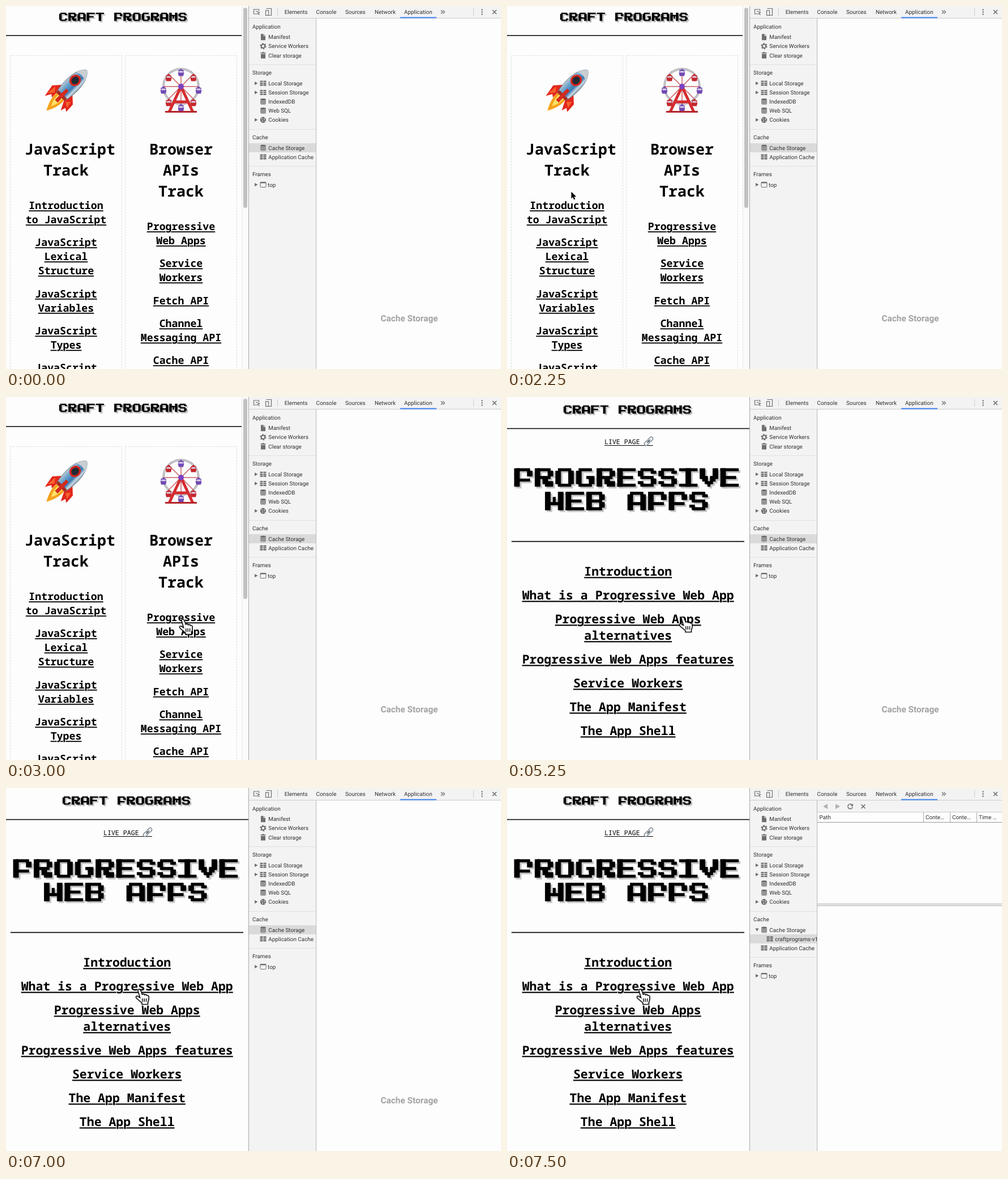
Animation, 874 px wide and 640 px high, one loop 8 s. Source, as an HTML page:

```html
<!DOCTYPE html>
<html lang="en">
<head>
<meta charset="utf-8">
<title>Cache storage demo</title>
<style>
  html, body { margin: 0; width: 100%; height: 100%; overflow: hidden; background: #fdfdfd; }
  svg { display: block; width: 100%; height: 100%; text-rendering: geometricPrecision; }
  .page { font-family: "Noto Sans Mono", monospace; font-weight: 700; text-anchor: middle; }
  .link { stroke: #fdfdfd; stroke-width: 2; paint-order: stroke; }
  .tools { font: 9.9px Roboto, "Liberation Sans", sans-serif; fill: #303030; }
  .icon { fill: #6e6e6e; }
  .line { stroke: #6e6e6e; fill: none; }
</style>
</head>
<body>
<svg id="stage" viewBox="0 0 874 640"></svg>
<script>
const LOOP = 8000, PAGE_CHANGE = 5250, CACHE_OPENED = 7250;

const rect = (x, y, w, h, fill = '#000', extra = '') =>
  `<rect x="${x}" y="${y}" width="${w}" height="${h}" fill="${fill}" ${extra}/>`;
const path = (d, attrs = '') => `<path d="${d}" ${attrs}/>`;
const text = (x, y, label, attrs = '') => `<text x="${x}" y="${y}" ${attrs}>${label}</text>`;
const at = (x, y, content, attrs = '') => `<g transform="translate(${x} ${y})" ${attrs}>${content}</g>`;

// Block lettering: bars on a 7 x 7 grid, combined into letters.
const BARS = {
  l: [0, 0, 2, 7], R: [5, 0, 2, 7], c: [0, 1, 2, 5], r: [5, 1, 2, 5],
  k: [0, 1, 2, 2], u: [5, 1, 2, 2], w: [5, 4, 2, 2], q: [5, 1, 2, 1],
  z: [0, 5, 2, 1], Z: [5, 5, 2, 1], a: [1, 0, 5, 1], t: [0, 0, 7, 1],
  m: [1, 3, 5, 1], p: [1, 4, 5, 1], e: [1, 2, 5, 1], d: [1, 6, 5, 1],
  b: [0, 6, 7, 1], i: [2.5, 0, 2, 7], x: [3, 4, 2, 2], y: [4, 5, 3, 2],
  g: [4, 3, 3, 1], f: [3, 2, 1, 3], h: [0, 0, 2, 4], j: [5, 0, 2, 4],
  n: [1, 3, 2, 2], o: [4, 3, 2, 2], v: [2, 5, 3, 1], s: [3, 6, 1, 1],
  A: [0, 1, 2, 6], B: [5, 1, 2, 6]
};
const LETTERS = {
  A: 'ABap', B: 'lamudw', C: 'cadqZ', E: 'ltmb', F: 'ltm', G: 'cadwg', I: 'tib', M: 'lRef',
  O: 'crad', P: 'laup', R: 'laumxy', S: 'akmwdqz', T: 'ti', V: 'hjnovs', W: 'lRfp'
};

function blockText(x, y, advance, label, shadow) {
  const unit = advance / 8;
  const d = [...label].map((letter, n) => [...(LETTERS[letter] || '')].map(key => {
    const [bx, by, w, h] = BARS[key];
    return `M${bx + n * 8} ${by}h${w}v${h}h${-w}z`;
  }).join('')).join('');
  const layer = (offset, color) => path(d, `fill="${color}" stroke="${color}" stroke-width=".18"
    transform="translate(${x + offset} ${y + offset}) scale(${unit})"`);
  return `<g role="img" aria-label="${label}">${layer(shadow, '#c4c4c4')}${layer(0, '#000')}</g>`;
}

function links(x, size, rows) {
  return rows.map(([y, label]) => {
    const width = label.length * size * 0.6;
    return rect(x - width / 2, y + 2.3, width, size / 10) +
      text(x, y, label, `class="link" font-size="${size}"`);
  }).join('');
}

const headings = rows => rows.map(([x, y, label]) => text(x, y, label, 'font-size="26.67"')).join('');

const rocket = `<g transform="translate(107 149) rotate(45) scale(.97)">
  ${path('M-9 14Q-13 29 0 52Q12 30 9 14Z', 'fill="#f6a21c"')}
  ${path('M-5 14Q-7 28 0 40Q7 28 5 14Z', 'fill="#ffe36a"')}
  ${path('M-11 -4L-25 12L-21 35L-15 24L-10 28V12ZM11 -4L26 10L27 28L21 24L18 33L9 15Z', 'fill="#e3251b"')}
  ${path('M-20 9L-21 28L-13 18ZM20 9L23 22L13 16Z', 'fill="#f4622e"')}
  ${path('M0 -52C14 -43 18 -16 11 15H-11C-18 -16 -14 -43 0 -52Z', 'fill="url(#hull)" stroke="#5f6f7c" stroke-width=".8"')}
  ${path('M0 -52C6 -48 9 -43 11 -36Q0 -42 -11 -36C-9 -43 -6 -48 0 -52Z', 'fill="#c9ced2"')}
  <ellipse cx="-2" cy="-24" rx="10" ry="11" fill="#d5251c"/>
  <ellipse cx="-2" cy="-24" rx="6.5" ry="7.5" fill="#222b35"/>
  ${path('M-11 10H11V16H-11Z', 'fill="#a72d23"')}
  ${path('M-3 -2H3L4 27H-3Z', 'fill="#d62a1e"')}
</g>`;

function ferrisWheel() {
  let spokes = '', cabins = '';
  for (let n = 0; n < 8; n++) {
    const angle = n * Math.PI / 4, x = 31 * Math.cos(angle), y = 31 * Math.sin(angle);
    spokes += path(`M0 0L${x} ${y}`, 'stroke="#c8565a" stroke-width="1.4"');
    const color = n % 2 ? '#c5262c' : '#7048b4';
    cabins += at(x, y + 7.5, rect(-4, -5, 8, 5, '#d8cfe4', `stroke="${color}"`) +
      path('M-5.5 -1H5.5L4 5H-4ZM-5 -4L0 -8L5 -4Z', `fill="${color}"`));
  }
  return at(309, 142, `<circle r="31" fill="none" stroke="#96949b" stroke-width="3.4"/>
    <circle r="31" fill="none" stroke="#dedde2" stroke-width="1.5"/>
    ${spokes}${cabins}
    ${path('M0 0L-21 45M0 0L21 45M-12 27H12', 'fill="none" stroke="#d42c30" stroke-width="5"')}
    ${rect(-28, 43, 56, 3, '#b4252b')}<circle r="5" fill="#7b42c4"/>`);
}

const homePage = `
  ${blockText(94, 12, 16.2, 'CRAFT PROGRAMS', 2.5)}
  ${rect(0, 51.3, 416, 1.6, '#111')}
  <g fill="none" stroke="#dadada" stroke-dasharray="3 2">
    <rect x="7.5" y="87.5" width="197" height="600"/><rect x="210.5" y="87.5" width="197" height="600"/>
  </g>
  ${rocket}${ferrisWheel()}
  ${headings([[113, 262, 'JavaScript'], [106, 299, 'Track'],
    [309, 262, 'Browser'], [309, 299, 'APIs'], [309, 336, 'Track']])}
  ${links(106, 18.25, [[358, 'Introduction'], [383, 'to JavaScript'], [423, 'JavaScript'],
    [448, 'Lexical'], [473, 'Structure'], [513.5, 'JavaScript'], [538.5, 'Variables'],
    [579, 'JavaScript'], [604, 'Types'], [644, 'JavaScript']])}
  ${links(309, 18.25, [[395, 'Progressive'], [420, 'Web Apps'], [460, 'Service'], [485, 'Workers'],
    [525.5, 'Fetch API'], [566, 'Channel'], [591, 'Messaging API'], [631, 'Cache API']])}
  ${rect(416, 0, 12, 640, '#fafafa')}${rect(416, 0, 1, 640, '#e7e7e7')}
  ${rect(419, 3, 7, 353, '#c1c1c1', 'rx="3.5"')}`;

const chain = at(250, 78, `<g transform="rotate(-45)" fill="none" stroke="#8a949b" stroke-width="1.7">
  <rect x="-9.5" y="-3" width="10" height="6" rx="3"/><rect x="-.5" y="-3" width="10" height="6" rx="3"/>
  <path d="M-4 0H4" stroke="#59636a"/></g>`);

const topicPage = `
  ${blockText(100, 15, 16.2, 'CRAFT PROGRAMS', 2.5)}
  ${rect(0, 54.8, 428, 1.6, '#111')}
  ${text(172, 83, 'LIVE PAGE', 'font-size="11.6" font-weight="400" text-anchor="start"')}
  ${rect(172, 85, 86, 1)}${chain}
  ${blockText(13, 126, 36.4, 'PROGRESSIVE', 3)}
  ${blockText(67.5, 167.5, 36.4, 'WEB APPS', 3)}
  ${rect(8, 253.8, 411, 1.8, '#111')}
  ${links(213.7, 21.5, [[315, 'Introduction'], [357, 'What is a Progressive Web App'],
    [399, 'Progressive Web Apps'], [428, 'alternatives'], [470, 'Progressive Web Apps features'],
    [512, 'Service Workers'], [554, 'The App Manifest'], [596, 'The App Shell']])}`;

// Icons are centred on 0,0.
const icons = {
  file: path('M-4 -5.5H1L4 -2.5V5.5H-4Z', 'class="icon"') + path('M1 -5.5V-2.5H4', 'fill="none" stroke="#f3f3f3"'),
  gear: '<circle r="3.2" class="line" stroke-width="2"/><circle r="4.7" class="line" stroke-width="1.8" stroke-dasharray="2.46"/>',
  trash: path('M-4.5 -5H-2L-1 -6H1L2 -5H4.5V-3.5H-4.5ZM-4 -2.5H4V5.5H-4Z', 'class="icon"'),
  table: path('M-5.5 -3.3H-.5M.5 -3.3H5.5M-5.5 0H-.5M.5 0H5.5M-5.5 3.3H-.5M.5 3.3H5.5', 'class="line" stroke-width="2.4"'),
  database: path('M-5 -3.5A5 2 0 0 1 5 -3.5V3.5A5 2 0 0 1 -5 3.5Z', 'class="icon"') +
    path('M-5 -3A5 2 0 0 0 5 -3M-5 -.3A5 2 0 0 0 5 -.3M-5 2.4A5 2 0 0 0 5 2.4', 'fill="none" stroke="#f3f3f3" stroke-width=".8"'),
  cookie: '<circle r="5.2" class="icon"/><g fill="#f3f3f3"><circle cx="-2" cy="-2" r="1"/><circle cx="2" cy="-1" r="1"/><circle cx="-1" cy="2" r="1"/><circle cx="3" cy="2.5" r=".8"/><circle cx="4" cy="-4" r="1.5"/></g>',
  frame: rect(-5, -4.5, 10, 9, 'none', 'stroke="#6e6e6e" rx="1"') + rect(-5, -4.5, 10, 2, '#6e6e6e'),
  closed: path('M-2.5 -3L3 0L-2.5 3Z', 'class="icon"'),
  open: path('M-3 -2.5H3L0 3Z', 'class="icon"'),
  cross: path('M-3.5 -3.5L3.5 3.5M3.5 -3.5L-3.5 3.5', 'class="line" stroke-width="1.6"')
};
const icon = (name, x, y, attrs) => at(x, y, icons[name], attrs);
const item = (y, name, label, arrow = '', indent = 0) =>
  (arrow && icon(arrow, 441.5, y)) + icon(name, 454 + indent, y) +
  text((name === 'frame' ? 462 : 463.3) + indent, y + 3.5, label);
const rule = y => rect(429, y, 118, 1, '#e0e0e0');

const devtools = `
  ${rect(429, 0, 445, 640, '#fdfdfd')}${rect(429, 0, 445, 21, '#f3f3f3')}
  ${rect(429, 21, 119, 619, '#f3f3f3')}${rect(429, 21, 445, 1, '#cbcbcb')}
  ${rect(428, 0, 1, 640, '#a8a8a8')}${rect(547, 22, 1, 618, '#b8b8b8')}
  ${path('M446 14H437.5V6H446.5V9M441 9L447.5 11.5L445 12.5L447.5 16', 'class="line" stroke-width="1.2"')}
  ${path('M460 5V4.5H468.5V16.5H463', 'class="line" stroke-width="1.2"')}
  ${rect(458.5, 8, 5, 8.5, '#f3f3f3', 'stroke="#6e6e6e" stroke-width="1.2"')}
  ${rect(479, 4, 1, 13, '#ccc')}${rect(825, 4, 1, 13, '#ccc')}
  ${[[491.7, 'Elements'], [547.5, 'Console'], [599, 'Sources'], [651, 'Network'], [703, 'Application']]
    .map(([x, label]) => text(x, 14, label)).join('')}
  ${rect(696, 19.5, 64, 2, '#4285f4')}
  ${path('M768 7.5L771 10.5L768 13.5M771.5 7.5L774.5 10.5L771.5 13.5', 'class="line" stroke-width="1.3"')}
  ${[6.5, 10.5, 14.5].map(y => `<circle cx="840.5" cy="${y}" r="1.2" class="icon"/>`).join('')}
  ${icon('cross', 862.5, 10.5)}
  ${text(435, 39.5, 'Application')}
  ${item(54.8, 'file', 'Manifest')}${item(70.8, 'gear', 'Service Workers')}${item(87, 'trash', 'Clear storage')}
  ${rule(103)}${text(435, 121, 'Storage')}
  ${item(136.2, 'table', 'Local Storage', 'closed')}${item(152.4, 'table', 'Session Storage', 'closed')}
  ${item(168.6, 'database', 'IndexedDB')}${item(184.6, 'database', 'Web SQL')}
  ${item(200.8, 'cookie', 'Cookies', 'closed')}
  ${rule(217)}${text(435, 234.5, 'Cache')}
  <g id="selection">${rect(429, 242, 118, 16, '#dadada')}</g>
  ${item(250, 'database', 'Cache Storage')}
  <g id="lowerTree">${item(266, 'table', 'Application Cache')}
    ${rule(282)}${text(435, 299.8, 'Frames')}${item(315, 'frame', 'top', 'closed')}</g>
  <g id="emptyView">${text(712, 556, 'Cache Storage',
    'text-anchor="middle" fill="#a3a3a3" style="font-size:15.4px;font-weight:700"')}</g>
  <g id="cacheView">
    ${icon('open', 441.5, 250)}${item(266, 'table', 'craftprograms-v1', '', 10)}
    ${rect(548, 22, 326, 20, '#f3f3f3')}${rect(548, 42, 326, 1, '#cbcbcb')}
    ${path('M566 28V37L558 32.5ZM580 28V37L588 32.5Z', 'fill="#b0b0b0"')}
    ${path('M609.5 30A4.2 4.2 0 1 0 610.2 33.5', 'class="line" stroke-width="1.5"')}
    ${path('M611 27.5V32H606.5Z', 'class="icon"')}${icon('cross', 629, 32.5)}
    ${[735, 782, 829].map(x => rect(x, 43, 1, 17, '#aaa')).join('')}${rect(548, 60, 326, 1, '#999')}
    ${[[551.5, 'Path'], [739, 'Conte…'], [786, 'Conte…'], [833, 'Time …']]
      .map(([x, label]) => text(x, 55, label)).join('')}
    ${rect(548, 204, 326, 4, '#f3f3f3')}${rect(548, 204, 326, 1, '#aaa')}${rect(548, 207, 326, 1, '#aaa')}
  </g>`;

const arrow = path('M0 0V12L2.8 9.5L4.9 14L7 13.1L5 8.7H8.8Z', 'stroke="#fff" stroke-width="1" paint-order="stroke"');
const hand = path(`M6 4.5C5.5 1 9.5 .8 10.8 4L13.5 11C15 9.3 17 10 17.6 11.8C19 10.5 21 11 21.6 12.8
  C23 12 25 13 25.2 15.2C25.7 19 25 22 23.5 25V28.5H13V26C10 23 6 20.5 3 17.2C1 14 5 12.5 7.5 15.5L9.5 16.5Z`,
  'fill="#fff" stroke="#111" stroke-width="1.7"') +
  path('M13.7 18L14 24M17.2 18V24M20.7 18L20.5 24', 'fill="none" stroke="#111" stroke-width="1.5"');

const stage = document.getElementById('stage');
stage.innerHTML = `
  <defs><linearGradient id="hull">
    <stop offset="0" stop-color="#b9c8d3"/><stop offset=".35" stop-color="#5f9dcb"/>
    <stop offset=".65" stop-color="#3c79b0"/><stop offset=".85" stop-color="#c8d9e4"/>
    <stop offset="1" stop-color="#7f93a2"/>
  </linearGradient></defs>
  ${rect(0, 0, 874, 640, '#fdfdfd')}
  <g id="home" class="page">${homePage}</g><g id="topic" class="page">${topicPage}</g>
  <g class="tools">${devtools}</g>
  <g id="arrow">${arrow}</g><g id="hand">${hand}</g>`;

// Pointer positions: start time, shape, x, y.
const POINTER = [
  [0, 'none', 0, 0], [250, 'arrow', 376, 304], [500, 'arrow', 41, 370], [750, 'arrow', 61, 361],
  [1000, 'arrow', 348, 297], [1250, 'arrow', 326, 299], [1500, 'arrow', 119, 334],
  [2000, 'arrow', 114, 328], [2250, 'arrow', 113.5, 327.5],
  [2750, 'hand', 297, 399], [3000, 'hand', 304, 390], [5250, 'hand', 302, 386],
  [5500, 'hand', 295, 387], [5750, 'hand', 284, 382], [6000, 'hand', 231, 356],
  [6250, 'hand', 226, 351], [6500, 'hand', 227, 352], [7000, 'hand', 227, 353]
];

const byId = id => document.getElementById(id);
const show = (id, visible) => byId(id).setAttribute('visibility', visible ? 'visible' : 'hidden');
const move = (id, x, y) => byId(id).setAttribute('transform', `translate(${x} ${y})`);

function draw(now) {
  const time = now % LOOP;
  const cacheOpen = time >= CACHE_OPENED;
  show('home', time < PAGE_CHANGE);
  show('topic', time >= PAGE_CHANGE);
  show('emptyView', !cacheOpen);
  show('cacheView', cacheOpen);
  move('selection', 0, cacheOpen ? 16 : 0);
  move('lowerTree', 0, cacheOpen ? 16 : 0);

  const [, shape, x, y] = POINTER.findLast(([start]) => time >= start);
  for (const id of ['arrow', 'hand']) {
    show(id, id === shape);
    move(id, x, y);
  }
}

const startTime = performance.now();
function tick() {
  draw(performance.now() - startTime);
  requestAnimationFrame(tick);
}
tick();
</script>
</body>
</html>
```
